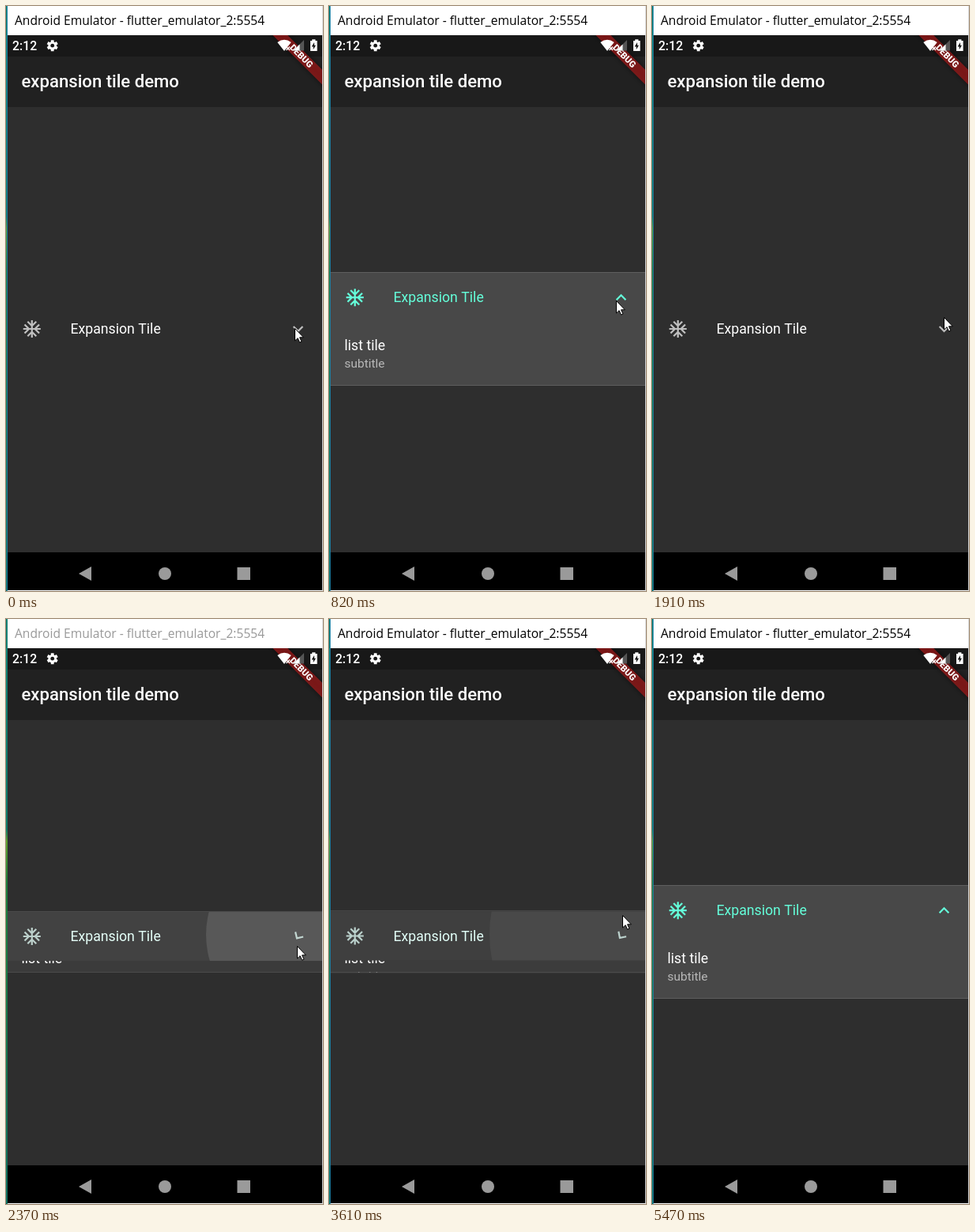
An HTML page with a canvas for the animation above (5900 ms loop, 401x741 px).

```html
<!DOCTYPE html>
<html lang="en">
<head>
<meta charset="utf-8">
<title>Expansion tile demo</title>
<style>
  html, body { margin: 0; width: 100%; height: 100%; overflow: hidden; background: #fff; }
  canvas { display: block; width: 401px; height: 741px; }
</style>
</head>
<body>
<canvas id="stage" width="401" height="741"></canvas>
<script>
const ctx = document.getElementById('stage').getContext('2d');
const LOOP = 5900;
const STEP = 137;
const DP = 398 / 360;
const LEFT = 2, RIGHT = 400, WIDTH = 398, MID = 409;
const HEADER = 56 * DP, CHILD = 72 * DP, BORDER = DP;
const ROBOTO = 'Roboto, sans-serif';
const ACCENT = [100, 255, 218], WHITE = [255, 255, 255];

// taps open and close the tile in turn
const TAPS = [166, 1248, 2257, 3437, 4413];
const EXPAND = 200, EASE = 1.7;

// step, x, y
const PATH = [
  [0, 365, 408], [4, 365, 408], [6, 363, 373], [10, 370, 368],
  [17, 368, 414], [20, 364, 423], [22, 360, 382], [26, 371, 375],
  [33, 377, 423], [36, 367, 438], [38, 331, 708]
];

const clamp = v => Math.min(1, Math.max(0, v));
const lerp = (a, b, k) => a + (b - a) * k;
const white = a => `rgba(255,255,255,${a})`;
const tint = (k, alpha = 1) =>
  `rgba(${WHITE.map((v, i) => Math.round(lerp(v, ACCENT[i], k)))},${alpha})`;

function pointerAt(step) {
  const next = PATH.findIndex(p => p[0] > step);
  if (next < 0) return PATH.at(-1).slice(1);
  const a = PATH[next - 1], b = PATH[next];
  const k = (step - a[0]) / (b[0] - a[0]);
  return [1, 2].map(i => Math.round(lerp(a[i], b[i], k)));
}

function tileAt(time) {
  const press = 40;
  const last = TAPS.findLastIndex(t => time >= t - press);
  if (last < 0) return { raw: 0, ink: 0, radius: 0 };
  const age = time - TAPS[last];
  const run = clamp(age / EXPAND);
  return {
    raw: last % 2 ? 1 - run : run,
    ink: Math.max(0, Math.min((age + press) / 900, .2 - .0012 * age)),
    radius: 43 + age
  };
}

function box(x, y, w, h, color) {
  ctx.fillStyle = color;
  ctx.fillRect(x, y, w, h);
}

function text(str, x, y, font, color) {
  ctx.font = font;
  ctx.fillStyle = color;
  ctx.fillText(str, x, y);
}

function trace(points) {
  points.forEach(([x, y], i) => i ? ctx.lineTo(x, y) : ctx.moveTo(x, y));
}

function poly(points, color) {
  ctx.beginPath();
  trace(points);
  ctx.closePath();
  ctx.fillStyle = color;
  ctx.fill();
}

function stroke(color, width) {
  ctx.strokeStyle = color;
  ctx.lineWidth = width;
  ctx.stroke();
}

function line(points, color, width) {
  ctx.beginPath();
  trace(points);
  stroke(color, width);
}

function disc(x, y, r, color) {
  ctx.beginPath();
  ctx.arc(x, y, r, 0, Math.PI * 2);
  ctx.fillStyle = color;
  ctx.fill();
}

function placed(x, y, scale, angle, draw) {
  ctx.save();
  ctx.translate(x, y);
  ctx.rotate(angle);
  ctx.scale(scale, scale);
  draw();
  ctx.restore();
}

function clipped(x, y, w, h, draw) {
  ctx.save();
  ctx.beginPath();
  ctx.rect(x, y, w, h);
  ctx.clip();
  draw();
  ctx.restore();
}

function drawWindow(active) {
  box(0, 0, 401, 741, '#fff');
  const edge = ctx.createLinearGradient(0, 0, 0, 741);
  [[0, '#0f8074'], [.36, '#0f7a68'], [.38, '#5f9e2c'], [.45, '#1d7d3a'], [1, '#0f6f60']]
    .forEach(([stop, color]) => edge.addColorStop(stop, color));
  box(0, 0, 2, 741, edge);
  if (active) box(1, 0, 1, 741, '#1a82a6');
  box(400, 0, 1, 741, '#d4d4d4');
  text('Android Emulator - flutter_emulator_2:5554', 11, 24,
    '15.6px "Open Sans", "Noto Sans", sans-serif', active ? '#000' : '#999');
}

function drawScreen() {
  box(LEFT, 37, WIDTH, 27, '#181818');
  box(LEFT, 64, WIDTH, 64, '#212121');
  box(LEFT, 128, WIDTH, 564, '#2e2e2e');
  text('expansion tile demo', 19.5, 103, `500 ${20 * DP}px ${ROBOTO}`, '#fff');
}

function drawBanner() {
  clipped(LEFT, 37, WIDTH, 655, () => placed(RIGHT, 37, DP, Math.PI / 4, () => {
    ctx.shadowColor = 'rgba(0,0,0,.8)';
    ctx.shadowBlur = 6 * DP;
    box(-50, 28, 100, 12, 'rgba(183,28,28,.63)');
    ctx.shadowColor = 'transparent';
    ctx.textAlign = 'center';
    text('DEBUG', 0, 37.2, `900 10.2px ${ROBOTO}`, '#fff');
  }));
}

function drawStatus() {
  text('2:12', 8, 56, `500 15.8px ${ROBOTO}`, '#fff');

  placed(58.7, 50.2, 1, 0, () => {
    for (let i = 0; i < 3; i++) {
      ctx.rotate(Math.PI / 3);
      box(-1.9, -7, 3.8, 14, '#fff');
    }
    disc(0, 0, 5.3, '#fff');
    disc(0, 0, 2.4, '#181818');
  });

  // wifi without a connection
  ctx.beginPath();
  ctx.moveTo(352, 57);
  ctx.lineTo(343.3, 46);
  ctx.quadraticCurveTo(352, 39.5, 360.7, 46);
  trace([[360.7, 46], [357.2, 50.4], [353.2, 50.4], [353.2, 55.5], [352, 57], [343.3, 46]]);
  ctx.fillStyle = '#fff';
  ctx.fill();
  line([[354.5, 51.4], [359, 56]], '#fff', 1.4);
  line([[359, 51.4], [354.5, 56]], '#fff', 1.4);

  poly([[363.5, 56.5], [377, 43], [377, 56.5]], '#555');
  poly([[363.5, 56.5], [371.5, 48.5], [371.5, 56.5]], '#fff');

  box(385, 44, 8.6, 13, '#fff');
  box(387.2, 42.3, 4.2, 2, '#fff');
  poly([[390, 46], [386.6, 51.4], [388.7, 51.4], [388.7, 55.2], [392, 49.7], [390, 49.7]], '#181818');
}

function drawNav() {
  box(LEFT, 692, WIDTH, 48, '#000');
  const gray = '#9a9a9a';
  poly([[92, 719], [108, 710], [108, 728]], gray);
  disc(201, 719, 8, gray);
  box(292.5, 711, 16.5, 16, gray);
}

function drawSnowflake(x, y, color) {
  placed(x, y, DP, 0, () => {
    ctx.beginPath();
    for (let i = 0; i < 4; i++) {
      trace([[0, 0], [0, -10]]);
      trace([[-4.95, -8.37], [0, -3.42], [4.95, -8.37]]);
      ctx.rotate(Math.PI / 2);
    }
    stroke(color, 2);
  });
}

function drawTile({ raw, ink, radius }, x) {
  const open = Math.pow(raw, EASE);
  const shade = 1 - Math.pow(1 - raw, EASE);
  const height = HEADER + 2 * BORDER + CHILD * open;
  const top = MID - height / 2;
  const head = top + BORDER;
  const fold = head + HEADER;
  const mid = head + HEADER / 2;
  const iconColor = tint(open, lerp(.7, 1, open));
  const large = `${16 * DP}px ${ROBOTO}`;

  box(LEFT, top, WIDTH, height, `rgba(72,72,72,${shade})`);
  for (const y of [top, top + height - BORDER])
    box(LEFT, Math.round(y), WIDTH, 1, white(.14 * shade));

  if (ink) clipped(LEFT, head, WIDTH, HEADER, () => {
    box(LEFT, head, WIDTH, HEADER, white(ink * .3));
    disc(x, mid - 2, radius, white(ink));
  });

  drawSnowflake(32.8, mid, iconColor);
  text('Expansion Tile', 81.5, Math.round(mid + 6.2), large, tint(open));
  placed(369.5, mid, DP, Math.PI * open, () =>
    line([[-5.3, -2.7], [0, 2.6], [5.3, -2.7]], iconColor, 2));

  // the child stays centred in the opening gap
  clipped(LEFT, fold, WIDTH, CHILD * open, () => {
    const y = fold - (1 - open) * CHILD / 2;
    text('list tile', 19.5, Math.round(y + 35.6), large, '#fff');
    text('subtitle', 19.5, Math.round(y + 57.5), `${14 * DP}px ${ROBOTO}`, '#b8b8b8');
  });
}

function drawPointer(x, y, busy) {
  placed(x + .5, y + .5, 1, 0, () => {
    poly([[0, 0], [0, 15.5], [3.6, 12.2], [6, 17.6], [8.4, 16.6], [6, 11.3], [10.8, 11.3]], '#fff');
    stroke('#000', 1);
  });
  if (!busy) return;
  [['#1683d8', 0, 7], ['#45b4f5', 3.4, 4.9]].forEach(([color, from, to]) => {
    ctx.beginPath();
    ctx.arc(x + 13.5, y - .5, 5.6, from, to);
    stroke(color, 4);
  });
}

function render(t) {
  const step = Math.floor((t + 15) / STEP);
  const [x, y] = pointerAt(step);
  drawWindow(step < 17 || step >= 24);
  drawScreen();
  drawTile(tileAt(step * STEP), x);
  drawBanner();
  drawStatus();
  drawNav();
  if (step < 40) drawPointer(x, y, step === 10 || step === 11);
}

const start = performance.now();
function tick() {
  render((performance.now() - start) % LOOP);
  requestAnimationFrame(tick);
}
tick();
</script>
</body>
</html>
```
